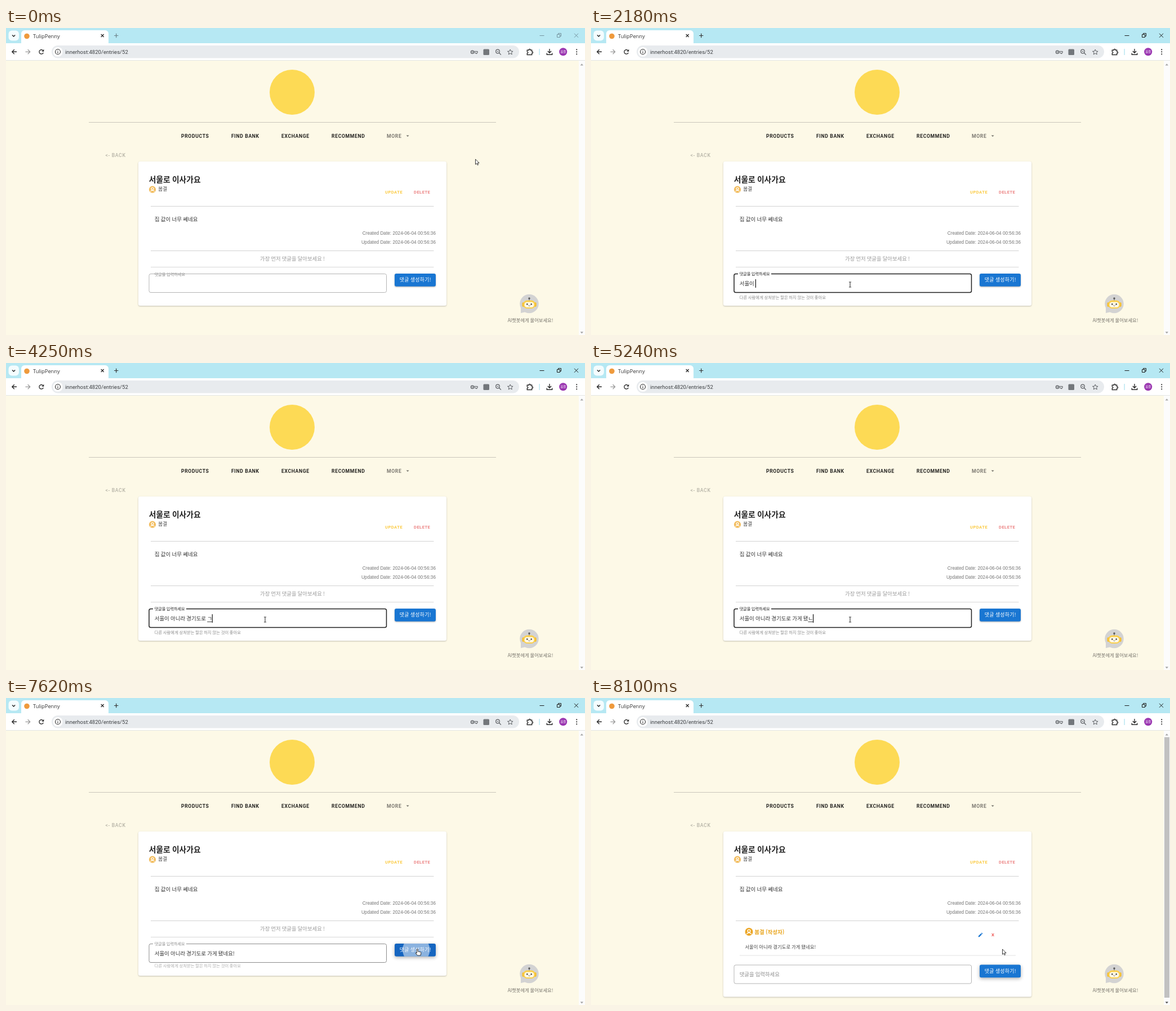
An HTML page with a canvas for the animation above (9140 ms loop, 1028x545 px).

```html
<!DOCTYPE html>
<html lang="ko">
<head>
<meta charset="utf-8">
<title>TulipPenny</title>
<style>
html, body { margin: 0; width: 100%; height: 100%; overflow: hidden; background: #fdf9e7; }
canvas { display: block; width: 1028px; height: 545px; }
</style>
</head>
<body>
<canvas id="stage" width="1028" height="545"></canvas>
<script>
const g = document.getElementById('stage').getContext('2d');
const LOOP = 9140, STEP = 98.75, END = 8100;
const FOCUS = 885, PRESS = 7460, POSTED = 7690;
const KR = '"Noto Sans CJK KR", "Noto Sans CJK JP", sans-serif';
const RB = 'Roboto, sans-serif';
const LS = '"Liberation Sans", Arial, sans-serif';
const USER = '봄결';
const COMMENT = '서울이 아니라 경기도로 가게 됐네요!';

// Keystroke runs: start time, settled text, composing states
const RUNS = [
  [1380, '', 'ㅅ,서'],
  [1680, '', '성,서우,서울,서울ㅇ,서울이'],
  [2170, '서울이 ', ',ㅇ,아,안,아니'],
  [2660, '서울이 ', '아닐,아니라'],
  [3060, '서울이 아니라 ', ',ㄱ,겨,경,경ㄱ,경기,경긷,경기도'],
  [3950, '서울이 아니라 경', '기돌,기도로'],
  [4150, '서울이 아니라 경기도로 ', ',ㄱ,가,각,가게'],
  [4640, '서울이 아니라 경기도로 가게 ', ',ㄷ,돼'],
  [5040, '서울이 아니라 경기도로 가게 ', '됐'],
  [5240, '서울이 아니라 경기도로 가게 ', '됐ㄴ,됐네,됐넹'],
  [5640, '서울이 아니라 경기도로 가게 ', '됐네요'],
  [5940, COMMENT, '']
];
const KEYS = RUNS.flatMap(([at, base, list]) =>
  list.split(',').map((s, i) => ({ at: at + i * 98, text: base + s })));

const clamp = v => Math.max(0, Math.min(1, v));
const mix = (a, b, p) => a + (b - a) * p;
const span = (t, a, b) => clamp((t - a) / (b - a));
const ease = p => p * p * (3 - 2 * p);
const easeOut = p => 1 - (1 - p) ** 3;

function text(s, x, cy, size, color, o = {}) {
  g.font = `${o.weight || 400} ${size}px ${o.font || KR}`;
  g.letterSpacing = (o.gap || 0) + 'px';
  g.textAlign = o.align || 'left';
  g.fillStyle = color;
  g.fillText(s, x, cy + size * 0.37);
  const w = g.measureText(s).width;
  g.letterSpacing = '0px';
  return w;
}
function rect(x, y, w, h, color) {
  g.fillStyle = color;
  g.fillRect(x, y, w, h);
}
function round(x, y, w, h, r, color) {
  g.beginPath();
  g.roundRect(x, y, w, h, r);
  g.fillStyle = color;
  g.fill();
}
function disc(x, y, r, color) {
  g.beginPath();
  g.arc(x, y, r, 0, Math.PI * 2);
  g.fillStyle = color;
  g.fill();
}
function ring(x, y, r, color, w = 1.2, a = 0, b = Math.PI * 2) {
  g.beginPath();
  g.arc(x, y, r, a, b);
  g.strokeStyle = color;
  g.lineWidth = w;
  g.stroke();
}
function path(d, color, w) {
  const p = new Path2D(d);
  if (w) {
    g.strokeStyle = color;
    g.lineWidth = w;
    g.stroke(p);
  } else {
    g.fillStyle = color;
    g.fill(p);
  }
}
function shadow(color, blur, y) {
  g.shadowColor = color;
  g.shadowBlur = blur;
  g.shadowOffsetY = y;
}
const noShadow = () => shadow('transparent', 0, 0);

function tabStrip(active) {
  const ink = active ? '#1d1d1d' : '#7595a0';
  rect(0, 0, 1028, 28, '#b6e8f3');
  round(4.5, 4.5, 18.5, 18, 6, '#f4fcfe');
  path('M11 12.5l2.6 2.6 2.6-2.6', '#222', 1.4);
  round(27, 4, 155, 28, 6, '#fff');
  disc(37, 14.5, 4.8, '#ef9a3c');
  text('TulipPenny', 48, 14.5, 9.3, '#333', { font: '"Open Sans", sans-serif' });
  path('M168.7 11l5 5m0-5l-5 5', '#222', 1.2);
  path('M192 13.5h7.4M195.7 9.8v7.4', active ? '#333' : '#6a8088', 1.2);
  path('M947.5 13.5h8M1009 9.8l7 7m0-7l-7 7', ink, 1);
  path('M978.5 11.5h5v5h-5zM980.5 11v-1.5h5v5H984', ink, 1);
}

function toolbar() {
  const ink = '#2b2b2b', soft = '#5a5d61';
  rect(0, 27, 1028, 31, '#fff');
  rect(0, 57, 1028, 1, '#e3e6e4');
  path('M19 42.3h-8M14.8 38.3l-4 4 4 4', ink, 1.4);
  path('M34.5 42.3h8M38.7 38.3l4 4-4 4', '#9a9a9a', 1.3);
  ring(62.8, 42.3, 3.8, ink, 1.4, 0.4, 5.5);
  path('M67.3 37.7v4h-4z', ink);
  round(81, 31, 830, 22.5, 11.2, '#e8ebee');
  disc(92, 42.3, 8.6, '#fff');
  ring(92, 42.3, 4.5, ink, 1.1);
  path('M92 41.7v3M92 39.7v1', ink, 1.1);
  text('innerhost:4820/entries/52', 105, 42.5, 9.6, '#3d4043', { font: RB });

  ring(828, 42.7, 2.6, soft, 1.2);
  disc(828, 42.7, 0.9, soft);
  path('M830.7 41.5h6.5v2.4h-1v1.5h-2v-1.5h-3.4', soft, 1);
  round(847.5, 37.5, 10.5, 10.5, 1.5, '#73777b');
  ring(873, 41.5, 3.3, soft, 1.2);
  path('M875.3 44l3.6 3.6M871.5 41.5h3', soft, 1.2);
  path('M895.3 38l1.4 3.1 3.4.3-2.6 2.2.8 3.3-3-1.8-3 1.8.8-3.3-2.6-2.2 3.4-.3z', soft, 1);
  path('M925.3 39.3h3c-.3-2.4 3.2-2.4 2.9 0h2.5v2.7c2.4-.2 2.4 3.2 0 3v2.5h-8.4v-2.6c2-.2 2-2.8 0-3z', ink, 1.4);
  rect(946.5, 37, 1.2, 11, '#a9e2ee');
  path('M965 37v6.7M961.8 41l3.2 3.2 3.2-3.2M960.3 44.5v2.7h9.4v-2.7', ink, 1.4);
  disc(989.2, 42.3, 7, '#9a35b0');
  text(USER, 989.2, 42.2, 5.2, '#fff', { align: 'center' });
  for (const y of [38.3, 42.3, 46.3]) disc(1013.2, y, 1.1, ink);
}

function person(x, y, r, color) {
  disc(x, y, r, color);
  g.save();
  g.beginPath();
  g.arc(x, y, r * 0.84, 0, Math.PI * 2);
  g.clip();
  ring(x, y - r * 0.22, r * 0.34, '#fff', r * 0.2);
  ring(x, y + r * 0.98, r * 0.72, '#fff', r * 0.2);
  g.restore();
}

function pageTop() {
  disc(508, 114, 40, '#fdda55');
  rect(147, 167, 723, 1, '#c9c6ba');
  const nav = { font: RB, weight: 700, gap: 0.6 };
  [['PRODUCTS', 311], ['FIND BANK', 400], ['EXCHANGE', 489], ['RECOMMEND', 578]]
    .forEach(([s, x]) => text(s, x, 191.7, 8.7, '#262522', nav));
  text('MORE', 676, 191.7, 8.7, '#7d7a72', nav);
  path('M710.6 190.5h5l-2.5 2.6z', '#6f6c65');
  text('<- BACK', 176.5, 226, 8.7, '#b5b2a6', { font: RB, weight: 500, gap: 0.6 });
}

function chatBadge() {
  path('M914 493v13l9-2z', '#d3d3d3');
  disc(929, 489.5, 16.7, '#d3d3d3');
  path('M929 480v5', '#777', 1.2);
  disc(929, 480, 1.7, '#555');
  round(916.5, 487, 4, 8, 2, '#f4bd2e');
  round(937.7, 487, 4, 8, 2, '#f4bd2e');
  round(918.5, 483.5, 21, 14.5, 6.5, '#fbcf4b');
  round(920.5, 486.5, 17, 9.5, 4.5, '#fff8e4');
  disc(925.3, 490.3, 1.3, '#444');
  disc(932.7, 490.3, 1.3, '#444');
  ring(929, 491.7, 1.8, '#666', 0.8, 0.3, 2.85);
  text('AI챗봇에게 물어보세요!', 931, 518.5, 8.3, '#77746c', { align: 'center' });
}

function scrollbar(posted) {
  rect(1017, 58, 11, 487, '#fcfcfc');
  if (posted) rect(1018, 69.5, 9, 462.5, '#c1c1c1');
  path('M1019.6 66.5h5.4l-2.7-3.2z', '#a5a5a5');
  path('M1019.6 539.2h5.4l-2.7 3.2z', posted ? '#555' : '#a5a5a5');
}

function card(h) {
  shadow('rgba(0,0,0,.24)', 2.5, 1);
  round(235, 237, 547, h, 3, '#fff');
  noShadow();
  text('서울로 이사가요', 253.7, 268.5, 13.8, '#222', { weight: 700 });
  person(260, 286.7, 6.1, '#f2bc5c');
  text(USER, 270.3, 286, 8.7, '#444');
  const act = { font: RB, weight: 700, gap: 0.45 };
  text('UPDATE', 673, 291.2, 7.6, '#fbcb45', act);
  text('DELETE', 724, 291.2, 7.6, '#ec8585', act);
  rect(257, 316, 502.5, 1, '#d2d2d2');
  text('집 값이 너무 쎄네요', 263.8, 339.5, 9.55, '#333');
  const date = { font: LS, align: 'right' };
  text('Created Date: 2024-06-04 00:56:36', 763, 363.5, 8.25, '#757575', date);
  text('Updated Date: 2024-06-04 00:56:36', 763, 380, 8.25, '#757575', date);
  rect(257, 395, 502.5, 1, '#d2d2d2');
}

function comments(q) {
  if (q < POSTED) {
    text('가장 먼저 댓글을 달아보세요 !', 508.5, 410, 9.4, '#9b9b9b', { align: 'center' });
    rect(257, 424, 502.5, 1, '#d8d8d8');
    return;
  }
  if (q > POSTED + 60) person(280.5, 415, 7, '#eca625');
  text(`${USER} (작성자)`, 290.3, 415, 9.5, '#e9a620', { weight: 700 });
  text(COMMENT, 273.3, 442, 8.4, '#444');
  path('M687.8 424.3v-1.7l4.5-4.5 1.7 1.7-4.5 4.5zM692.9 417.5l.9-.9 1.7 1.7-.9.9z', '#1976d2');
  text('X', 711, 420.5, 7.8, '#ee5350', { font: RB, weight: 700 });
  rect(264, 456.5, 490, 1, '#e2e2e2');
}

function field(t, q, dy) {
  const focused = q >= FOCUS && q < PRESS;
  const top = 436.5 + dy;
  let up = q < 200 ? 0.97 : 1 - ease(span(q, 150, 380));
  if (q >= FOCUS) up = easeOut(span(q, FOCUS, FOCUS + 190));
  if (q > POSTED + 20) up = 1 - ease(span(q, POSTED + 20, POSTED + 240));

  g.beginPath();
  g.roundRect(254, top, 421.5, 33, 3);
  g.strokeStyle = focused ? '#1f1f1f' : q > PRESS && up > 0.5 ? '#8c8c8c' : '#b5b5b5';
  g.lineWidth = focused ? 1.5 : 1;
  g.stroke();
  if (q > FOCUS + 50 && up > 0.4) rect(261, top - 1.5, 59, 3, '#fff');

  text('댓글을 입력하세요', 263.7, top + mix(16.8, q < 200 ? 0 : -0.5, up), mix(9.4, 7.1, up),
    focused ? '#222' : '#8d8d8d');

  let hint = 0;
  if (q >= FOCUS) hint = easeOut(span(q, FOCUS, FOCUS + 300));
  if (q >= PRESS) hint = 1 - span(q, PRESS, PRESS + 460);
  if (hint > 0) {
    g.globalAlpha = hint;
    text('다른 사람에게 상처받는 말은 하지 않는 것이 좋아요', 263.7, top + mix(33, 41.5, hint), 7.35, '#8a8a8a');
    g.globalAlpha = 1;
  }

  if (q < FOCUS || q >= POSTED) return;
  const key = KEYS.filter(k => k.at <= t).pop() || { at: FOCUS, text: '' };
  const x = 263.7, w = text(key.text, x, 453.5, 9.47, '#333');
  const last = key.text.slice(-1);
  if (last && !' !'.includes(last)) {
    rect(x + w - 8.7, 459, 8.5, 0.9, '#333');
  }
  if (focused && (q - key.at) % 1060 < 530) rect(x + w - 0.2, 446, 1.2, 15, '#111');
}

function button(q, dy, hover) {
  const y = 436 + dy;
  const lift = span(q, 6920, 7100);
  shadow('rgba(0,0,0,.32)', 2.5 + 3.5 * lift, 1 + lift);
  round(690, y, 73, 22.8, 3, hover ? '#1565c0' : '#1976d2');
  noShadow();
  if (q >= PRESS) {
    g.save();
    g.beginPath();
    g.roundRect(690, y, 73, 22.8, 3);
    g.clip();
    const r = 40 * easeOut(span(q, PRESS, PRESS + 550));
    disc(728.3, 447 + dy, r, `rgba(255,255,255,${0.5 * (1 - span(q, 7720, 8060))})`);
    g.restore();
  }
  text('댓글 생성하기!', 698.8, y + 11, 8.9, '#fff', { weight: 500, gap: 0.27 });
}

function pointerAt(q) {
  if (q < FOCUS) {
    const p = ease(span(q, 140, 850));
    return [mix(833.5, 460, p), mix(233, 455.5, p)];
  }
  if (q < 6900) {
    const p = ease(span(q, 6720, 6920));
    return [mix(460, 746, p), mix(455.5, 458, p)];
  }
  const p = ease(span(q, 6915, 7320));
  return [mix(746, 730.5, p), mix(458, 446, p)];
}

function pointer(x, y, kind) {
  g.save();
  g.translate(x, y);
  if (kind === 'beam') {
    path('M-2-4.5h1.4L0-4l.6-.5H2M0-4v8M-2 4.5h1.4L0 4l.6.5H2', '#222', 1);
  } else {
    const d = kind === 'hand'
      ? 'M-1 0q1-1.2 2 0v4l4.6 1q1 .4.8 1.6l-.8 4.4H0l-3.4-4.2q.4-1.4 2.4 0z'
      : 'M0 0v9.2l2.1-2 1.5 3.2 1.5-.7-1.4-3.1h3z';
    path(d, '#fff');
    path(d, '#222', 0.9);
  }
  g.restore();
}

function draw(t) {
  const k = Math.floor((t - 190) / STEP);
  const q = k < 0 ? 0 : Math.min(END, 200 + k * STEP);
  const posted = q >= POSTED;
  const dy = posted ? 37.5 : 0;
  const [x, y] = pointerAt(q);
  const inside = (l, r, a, b) => x > l && x < r && y > a + dy && y < b + dy;
  const overButton = inside(690, 763, 436, 457.5);
  const overField = inside(254, 676, 437, 470);

  rect(0, 0, 1028, 545, '#fdf9e7');
  tabStrip(q >= FOCUS);
  toolbar();
  pageTop();
  card(posted ? 293.5 : 256);
  comments(q);
  field(t, q, dy);
  button(q, dy, overButton);
  chatBadge();
  scrollbar(posted);
  pointer(x, y, overButton ? 'hand' : overField ? 'beam' : 'arrow');
}

const start = performance.now();
function tick() {
  draw((performance.now() - start) % LOOP);
  requestAnimationFrame(tick);
}
tick();
</script>
</body>
</html>
```
